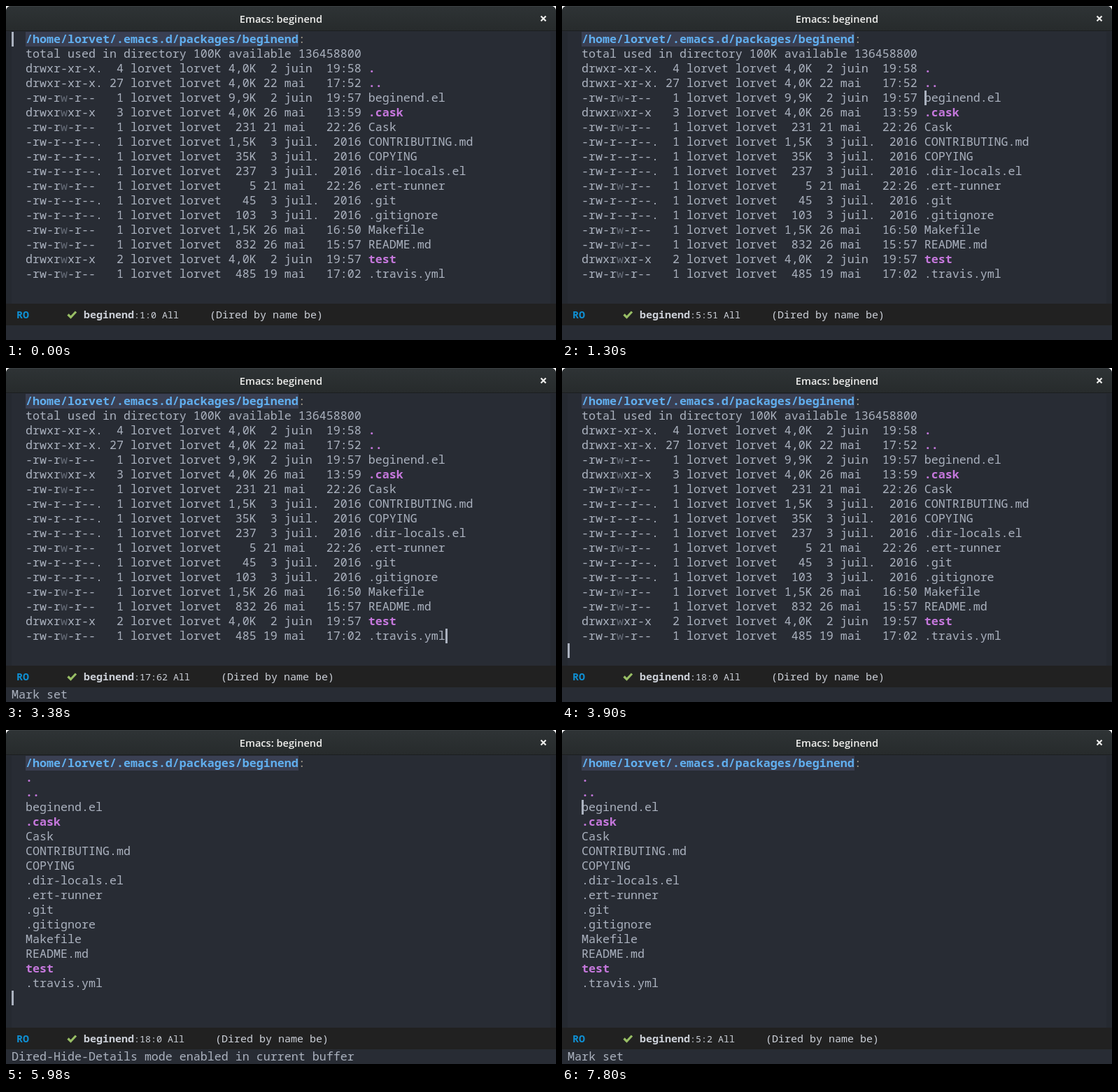
Write an HTML page that moves like this. It is 786 by 478 pixels and loops after 8 s.

```html
<!DOCTYPE html>
<html lang="en">
<head>
<meta charset="utf-8">
<title>Emacs: beginend</title>
<style>
html, body { margin: 0; width: 100%; height: 100%; overflow: hidden; background: #fff; }
#stage { position: relative; width: 786px; height: 478px; overflow: hidden; border-radius: 7px 7px 0 0;
  background: #282c34; color: #abb2bf; font: 16.667px/21px "Noto Sans Mono", monospace; }
#stage > * { position: absolute; margin: 0; white-space: pre; font-family: inherit; }
#title { left: 0; top: 0; width: 786px; height: 36px; box-sizing: border-box; text-align: center;
  background: linear-gradient(#2e3335, #272b2c); border-top: 1px solid #3b4042; border-bottom: 1px solid #1b1e1f;
  color: #eeeeec; font: 600 14.6px/35px "Open Sans", sans-serif; }
#stage > #title { font-family: "Open Sans", sans-serif; }
.fringe { top: 37px; width: 8px; height: 389px; background: #252930; }
#header { left: 28px; top: 37px; width: 390px; height: 21px; background: #3a3f52; }
#listing { left: 8px; top: 36px; }
#cursor { width: 3px; height: 21px; background: #abb2bf; }
#mode { left: 0; top: 426px; width: 786px; height: 31px; background: #212121; }
.mode { top: 431px; font-size: 15px; color: #ccd0d8; }
.mode small { font-size: 13.333px; }
#echo { left: 8px; top: 456px; }
b { font-weight: 700; }
.path { color: #61afef; }
.colon { color: #a39b8c; }
.dir { color: #c678dd; }
.dim { color: #646a76; }
</style>
</head>
<body>
<div id="stage">
  <div id="title">Emacs: beginend</div>
  <svg style="left:763px;top:13px" width="10" height="10"><path d="M1.5 1.5l7 7m0-7l-7 7" stroke="#eeeeec" stroke-width="2.2"/></svg>
  <div class="fringe" style="left:0"></div>
  <div class="fringe" style="left:778px"></div>
  <div id="header"></div>
  <pre id="listing"></pre>
  <div id="cursor"></div>
  <div id="mode"></div>
  <b class="mode" style="left:15px;color:#0f8fd2">RO</b>
  <svg style="left:87px;top:435px" width="15" height="13"><path d="M1.5 6.5l4 4L13 2.5" fill="none" stroke="#98be65" stroke-width="3.2"/></svg>
  <div class="mode" style="left:111px"><b>beginend</b><small id="position"></small></div>
  <div class="mode" id="modeName">(Dired by name be)</div>
  <div id="echo"></div>
</div>
<script>
const $ = id => document.getElementById(id);
const USER = "lorvet";

const files = `drwxr-xr-x.|4|4,0K|2|juin|19:58|.
drwxr-xr-x.|27|4,0K|22|mai|17:52|..
-rw-rw-r--|1|9,9K|2|juin|19:57|beginend.el
drwxrwxr-x|3|4,0K|26|mai|13:59|.cask
-rw-rw-r--|1|231|21|mai|22:26|Cask
-rw-r--r--.|1|1,5K|3|juil.|2016|CONTRIBUTING.md
-rw-r--r--.|1|35K|3|juil.|2016|COPYING
-rw-r--r--.|1|237|3|juil.|2016|.dir-locals.el
-rw-rw-r--|1|5|21|mai|22:26|.ert-runner
-rw-r--r--.|1|45|3|juil.|2016|.git
-rw-r--r--.|1|103|3|juil.|2016|.gitignore
-rw-rw-r--|1|1,5K|26|mai|16:50|Makefile
-rw-rw-r--|1|832|26|mai|15:57|README.md
drwxrwxr-x|2|4,0K|2|juin|19:57|test
-rw-rw-r--|1|485|19|mai|17:02|.travis.yml`.split("\n").map(line => line.split("|"));

function fileRow([perms, links, size, day, month, time, name], details) {
  const label = perms[0] === "d" ? `<b class="dir">${name}</b>` : name;
  if (!details) return "  " + label;
  const mode = perms.padEnd(11).replace(/^(.{5})w/, '$1<span class="dim">w</span>');
  return `  ${mode} ${links.padStart(2)} ${USER} ${USER} ${size.padStart(4)} ` +
    `${day.padStart(2)} ${month.padEnd(5)} ${time.padStart(5)} ${label}`;
}

function listing(details) {
  const path = `  <b class="path">/home/${USER}/.emacs.d/packages/beginend</b><span class="colon">:</span>`;
  const total = details ? ["  total used in directory 100K available 136458800"] : [];
  return [path, ...total, ...files.map(file => fileRow(file, details))].join("\n");
}

const full = listing(true), brief = listing(false);

// Listing, cursor row and column, mode line position, echo area
const steps = [
  [full, 0, 0, "1:0", ""],
  [full, 4, 51, "5:51", ""],
  [full, 16, 62, "17:62", "Mark set"],
  [full, 17, 0, "18:0", ""],
  [brief, 16, 0, "18:0", "Dired-Hide-Details mode enabled in current buffer"],
  [brief, 15, 13, "17:13", ""],
  [brief, 3, 2, "5:2", "Mark set"]
];
const LOOP = 8000, STEP = 1300;
let shown = -1;

function show(index) {
  const [text, row, column, position, echo] = steps[index];
  $("listing").innerHTML = text;
  $("cursor").style.left = 8 + column * 10 + "px";
  $("cursor").style.top = 37 + row * 21 + "px";
  $("position").textContent = `:${position} All`;
  $("modeName").style.left = 267 + position.length * 8 + "px";
  $("echo").textContent = echo;
  shown = index;
}

function tick() {
  const index = Math.floor(performance.now() % LOOP / STEP);
  if (index !== shown) show(index);
  requestAnimationFrame(tick);
}
tick();
</script>
</body>
</html>
```
